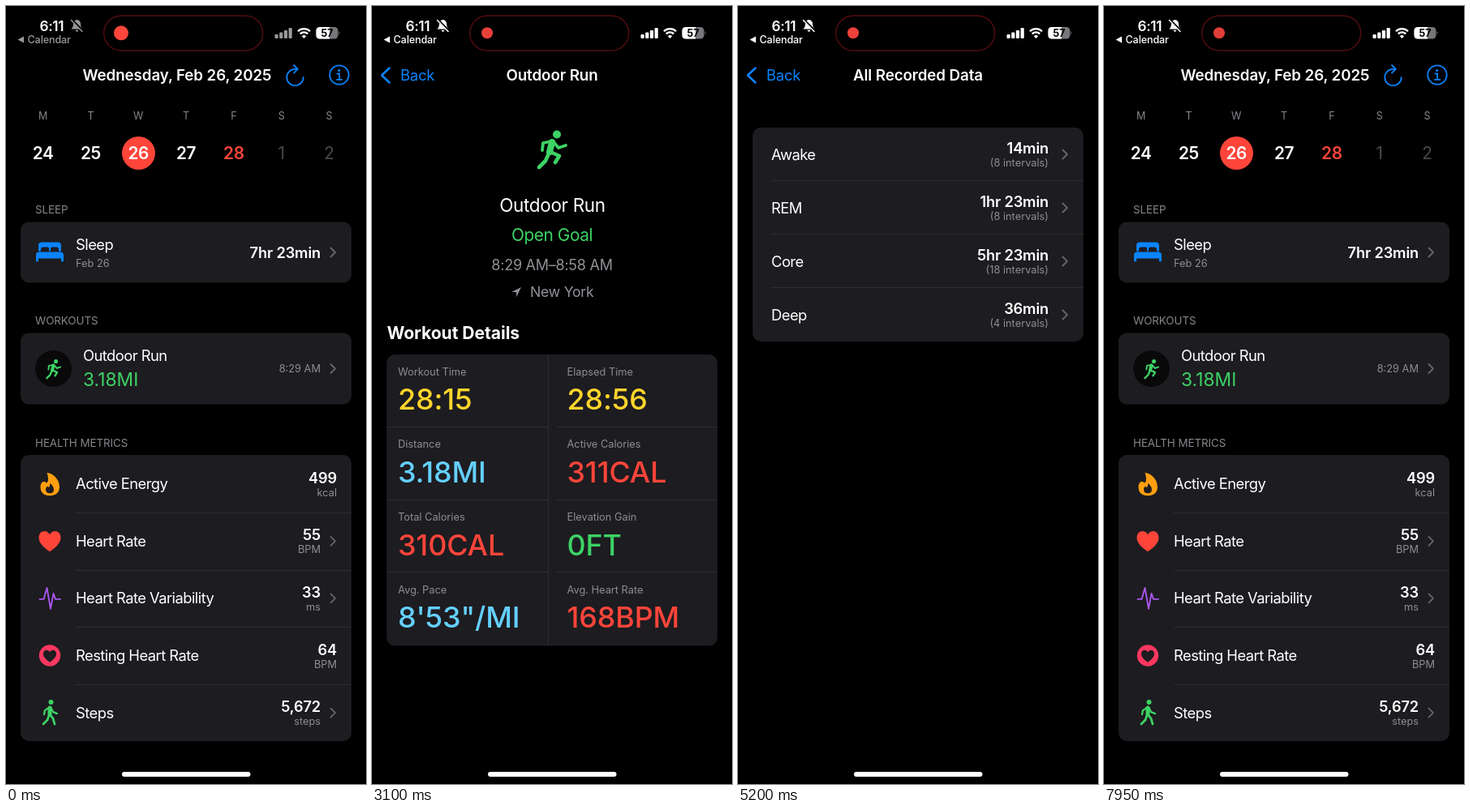
An HTML page for the animation above (8000 ms loop, 444 by 960 pixels).

```html
<!DOCTYPE html>
<html lang="en">
<head>
<meta charset="utf-8">
<title>Health diary</title>
<style>
  html, body { margin: 0; width: 100%; height: 100%; overflow: hidden; background: #000; }
  svg { display: block; width: 444px; height: 960px; }
  text { font-family: Inter, Roboto, sans-serif; fill: #fff; white-space: pre; }
  .body { font-size: 18.4px; letter-spacing: -.03em; }
  .title { font-size: 18.8px; font-weight: 600; letter-spacing: -.006em; }
  .value { font-size: 18.3px; font-weight: 600; letter-spacing: -.01em; }
  .small { font-size: 12.8px; fill: #8e8d93; }
  .section { font-size: 13.4px; letter-spacing: -.005em; fill: #87868c; }
  .day { font-size: 12.6px; fill: #87868c; }
  .date { font-size: 20.8px; font-weight: 600; letter-spacing: -.015em; }
  .future { font-size: 20.8px; fill: #4a494d; }
  .range { font-size: 18px; letter-spacing: -.014em; fill: #929197; }
  .place { font-size: 17.6px; letter-spacing: -.013em; fill: #929197; }
  .minutes { font-size: 18px; font-weight: 500; letter-spacing: -.02em; }
  .goal { font-size: 20.8px; letter-spacing: -.02em; }
  .name { font-size: 22.5px; letter-spacing: -.015em; }
  .distance { font-size: 22.8px; }
  .heading { font-size: 21px; font-weight: 700; }
  .big { font-size: 35.8px; font-weight: 500; letter-spacing: -.002em; }
  .back { font-size: 18.4px; letter-spacing: -.01em; }
  .clock { font-size: 17.3px; font-weight: 600; letter-spacing: -.02em; }
  .crumb { font-size: 12.6px; font-weight: 500; letter-spacing: -.01em; }
  .charge { font-size: 12.5px; font-weight: 700; }
</style>
</head>
<body>
<svg id="stage" viewBox="0 0 444 960"></svg>
<script>
const W = 444, LOOP = 8000, PARALLAX = 133;
const C = {
  card: '#1d1c20', line: '#2d2c31', blue: '#0a84ff', red: '#ff453a', green: '#3dd365',
  yellow: '#ffd52b', sky: '#64d0ff', orange: '#ff9f0f', purple: '#a955ee', pink: '#ff375f'
};

// Drawing helpers
const text = (x, y, str, cls, fill, anchor = 'start') =>
  `<text x="${x}" y="${y}" class="${cls}" text-anchor="${anchor}"${fill ? ` style="fill:${fill}"` : ''}>${str}</text>`;
const right = (x, y, str, cls, fill) => text(x, y, str, cls, fill, 'end');
const mid = (x, y, str, cls, fill) => text(x, y, str, cls, fill, 'middle');
const rect = (x, y, w, h, r, fill) => `<rect x="${x}" y="${y}" width="${w}" height="${h}" rx="${r}" fill="${fill}"/>`;
const card = (y, h) => rect(18, y, 408, h, 10, C.card);
const circle = (x, y, r, fill) => `<circle cx="${x}" cy="${y}" r="${r}" fill="${fill}"/>`;
const shape = (d, fill) => `<path d="${d}" fill="${fill}"/>`;
const stroke = (d, color, width) =>
  `<path d="${d}" fill="none" stroke="${color}" stroke-width="${width}" stroke-linecap="round" stroke-linejoin="round"/>`;
const rule = (x1, x2, y) => `<path d="M${x1} ${y}H${x2}" stroke="${C.line}"/>`;
const at = (x, y, scale, body) => `<g transform="translate(${x} ${y}) scale(${scale})">${body}</g>`;
const chevron = y => stroke(`M400.5 ${y - 5.5}l5.5 5.5l-5.5 5.5`, '#66656b', 1.8);

// Icons, centred on their own origin
const runner = circle(6, -18.5, 5, C.green) +
  stroke('M0 -9L-3 3', C.green, 8) +
  stroke('M2 -9L8 -2L17 -5M-1 -10L-11 -8L-12 1', C.green, 3.8) +
  stroke('M-2 3L9 8L4 16M-4 5L-8 14L-16 22', C.green, 4.6);
const walker = circle(1.5, -13, 3, C.green) +
  stroke('M0 -6L0 2', C.green, 5) +
  stroke('M0 -7L-6 -3L-7 2M1 -7L4 -1L9 1', C.green, 2.3) +
  stroke('M0 2L4 7L6 14M-1 3L-3 9L-8 14', C.green, 2.8);
const heartPath = 'M0 13C-4 10 -13.5 4 -13.5 -4C-13.5 -13 -4 -15 0 -8C4 -15 13.5 -13 13.5 -4C13.5 4 4 10 0 13Z';
const bed = shape('M-14 -1V-8Q-14 -12 -10 -12H10Q14 -12 14 -8V-1H11V-3Q11 -6 8 -6H3Q1 -6 1 -3V-1H-1V-3Q-1 -6 -3 -6H-8Q-11 -6 -11 -3V-1Z', C.blue) +
  shape('M-17 11V4Q-17 0 -13 0H13Q17 0 17 4V11Q17 12 15.5 12Q14 12 14 11V8H-14V11Q-14 12 -15.5 12Q-17 12 -17 11Z', C.blue);
const flame = shape('M-3.5 -14C4 -13 12 -6 12 4C12 10.5 7 14.5 0 14.5C-7 14.5 -11.5 10.5 -11.5 4C-11.5 0 -9.5 -3 -7.5 -3C-5.5 -3 -5 -1.5 -4 -1.5C-2.5 -1.5 -2 -4 -2 -6C-2 -9.5 -3 -12 -3.5 -14Z', C.orange) +
  shape('M0 -1C3 1 5 4 5 7C5 10 3 11.5 0 11.5C-3 11.5 -5 10 -5 7C-5 5 -4 3.5 -3 3C-2 4 -1 4 -1 4C0 3 0.5 1 0 -1Z', C.card);
const wave = stroke('M-12.5 1H-7.5L-3.5 -13L1 13L4.5 -6L7 1H13', C.purple, 1.9);
const restingHeart = circle(0, 0, 13.2, C.pink) + at(0, .5, .6, shape(heartPath, C.card));
const watch = rect(-4.5, -11.5, 9, 23, 3, C.blue) + rect(-7, -8, 14, 16, 4.5, C.blue) +
  rect(-5.2, -6.2, 10.4, 12.4, 3, '#12396b') + rect(7, -3, 1.4, 5, .7, C.blue);

// Screens
function homeScreen() {
  const days = [['M', 24], ['T', 25], ['W', 26], ['T', 27], ['F', 28], ['S', 1], ['S', 2]];
  let out = circle(163.5, 181.5, 20.5, C.red);
  days.forEach(([day, date], i) => {
    const x = 45.7 + i * 58.8;
    out += mid(x, 140, day, 'day') + mid(x, 189, date, i > 4 ? 'future' : 'date', i === 4 ? C.red : '');
  });
  out += text(36, 256, 'SLEEP', 'section') + card(266.5, 75) + at(54, 303.5, 1, bed) +
    text(86, 301, 'Sleep', 'body') + text(86, 321.5, 'Feb 26', 'small') +
    right(388, 310.5, '7hr 23min', 'value') + chevron(304);
  out += text(36, 393, 'WORKOUTS', 'section') + card(403.5, 88) +
    circle(58.5, 447.5, 22.5, '#09090a') + at(58.5, 448, .51, runner) +
    text(95, 438, 'Outdoor Run', 'body') + text(95, 469, '3.18MI', 'distance', C.green) +
    right(388, 452, '8:29 AM', 'small') + chevron(447.5);
  out += text(36, 544, 'HEALTH METRICS', 'section') + card(554, 353);
  const metrics = [
    ['Active Energy', '499', 'kcal', flame], ['Heart Rate', '55', 'BPM', shape(heartPath, C.red), true],
    ['Heart Rate Variability', '33', 'ms', wave, true], ['Resting Heart Rate', '64', 'BPM', restingHeart],
    ['Steps', '5,672', 'steps', walker, true]
  ];
  metrics.forEach(([label, value, unit, icon, linked], i) => {
    const y = 589.7 + i * 70.6, edge = linked ? 388 : 408;
    out += at(54, y, 1, icon) + text(86, y + 6.5, label, 'body') +
      right(edge, y - 1, value, 'value') + right(edge, y + 15, unit, 'small');
    if (linked) out += chevron(y);
    if (i) out += rule(86, 426, Math.round(y - 35.3) + .5);
  });
  return out;
}

function runScreen() {
  let out = at(222, 177, 1, runner) + mid(222.5, 254, 'Outdoor Run', 'name') +
    mid(222, 289.5, 'Open Goal', 'goal', C.green) + mid(222, 326, '8:29 AM–8:58 AM', 'range') +
    shape('M184 347L172 353H178V359Z', '#929197') + text(195, 359, 'New York', 'place') +
    text(18.5, 411, 'Workout Details', 'heading') + card(430, 359.5);
  const cells = [
    ['Workout Time', '28:15', C.yellow], ['Elapsed Time', '28:56', C.yellow],
    ['Distance', '3.18MI', C.sky], ['Active Calories', '311CAL', C.red],
    ['Total Calories', '310CAL', C.red], ['Elevation Gain', '0FT', C.green],
    ['Avg. Pace', '8\'53"/MI', C.sky], ['Avg. Heart Rate', '168BPM', C.red]
  ];
  cells.forEach(([label, value, color], i) => {
    const x = i % 2 ? 240.5 : 32, y = 430 + (i >> 1) * 89.8;
    out += text(x, y + 25.5, label, 'small') + text(x, y + 68, value, 'big', color);
    if (i > 1) out += i % 2 ? rule(228, 426, Math.round(y) - .5) : rule(18, 217, Math.round(y) - .5);
  });
  return out + `<path d="M217.5 430V789" stroke="${C.line}"/>`;
}

function sleepScreen() {
  const stages = [['Awake', '14min', 8], ['REM', '1hr 23min', 8], ['Core', '5hr 23min', 18], ['Deep', '36min', 4]];
  return card(150, 264) + stages.map(([label, value, count], i) => {
    const y = 183 + i * 66;
    return text(41, y + 6.5, label, 'body') + right(383, y - 1, value, 'value') +
      right(383, y + 15, `(${count} intervals)`, 'small') + chevron(y) + (i ? rule(41, 426, y - 33.5) : '');
  }).join('');
}

function intervalScreen() {
  const rows = [[6, '1:08', '1:14'], [0, '2:07', '2:07'], [0, '4:27', '4:27'], [1, '4:32', '4:33'],
    [0, '7:20', '7:20'], [3, '7:22', '7:25'], [2, '7:27', '7:29'], [0, '7:44', '7:44']];
  return text(18, 141, 'AWAKE INTERVALS', 'section') + card(162, 423.5) + rows.map(([min, from, to], i) => {
    const y = 188.2 + i * 52.95;
    return at(43, y, 1, watch) + text(64, y + 6.5, min + 'min', 'minutes') +
      right(412, y + 6.5, `${from} AM - ${to} AM`, 'range') + (i ? rule(64, 426, Math.round(y - 26.5) + .5) : '');
  }).join('');
}

const homeBar = text(94.5, 92, 'Wednesday, Feb 26, 2025', 'title') +
  stroke('M359 77.8H356.5A10.2 10.2 0 1 0 366.7 88M355 73L359.8 77.8L355 82.6', C.blue, 1.8) +
  `<circle cx="411" cy="85" r="11.7" fill="none" stroke="${C.blue}" stroke-width="1.8"/>` +
  circle(410.7, 79.5, 1.6, C.blue) + stroke('M408.5 83.5H411.2V90.5M408 90.8H414.3', C.blue, 1.8);
const backButton = stroke('M21.5 76.5L12 85.5L21.5 94.5', C.blue, 2.5) + text(35, 92, 'Back', 'back', C.blue);

const statusBar = text(41.5, 30.5, '6:11', 'clock') +
  `<g id="fading">${shape('M14.5 41.5L22 37.5V45.5Z', '#fff') + text(26.5, 46, 'Calendar', 'crumb')}
   ${shape('M80.5 28.5Q83 26.5 83 22.5Q83 17.5 87.5 17Q92 17.5 92 22.5Q92 26.5 94.5 28.5Z', '#fff')}
   ${shape('M85.5 29.7H89.5Q89 31.8 87.5 31.8Q86 31.8 85.5 29.7Z', '#fff')}
   ${stroke('M81.5 17.5L95 31', '#000', 3) + stroke('M80.5 17.5L94 31.5', '#fff', 1.5)}
   ${[5, 7.5, 10, 13].map((h, i) => rect(331.5 + i * 5.7, 40 - h, 4.2, h, 1.2, '#fff')).join('')}</g>` +
  `<path d="M360 31.2A10.6 10.6 0 0 1 375 31.2M362.8 34.4A6.6 6.6 0 0 1 372.2 34.4" fill="none" stroke="#fff" stroke-width="2.3"/>` +
  shape('M367.5 40L364.8 37.2A3.9 3.9 0 0 1 370.2 37.2Z', '#fff') +
  rect(382.5, 26, 27, 14.5, 4.5, '#77767a') +
  shape('M387 26H399V40.5H387Q382.5 40.5 382.5 36V30.5Q382.5 26 387 26Z', '#fff') +
  shape('M410.5 31Q412.5 33.2 410.5 35.5Z', '#77767a') + mid(396, 37.8, '57', 'charge', '#000') +
  `<rect x="120.7" y="12" width="196" height="43" rx="21.5" fill="#000" stroke="#550d10" stroke-width="1.4"/>` +
  `<circle id="dot" cx="142" cy="33.3"/>` + rect(143, 945, 158.5, 6, 3, '#fff');

// Listed from the bottom of the navigation stack upwards
const content = {
  home: [homeScreen(), homeBar],
  run: [runScreen(), mid(222, 92, 'Outdoor Run', 'title')],
  sleep: [sleepScreen(), mid(222, 92, 'All Recorded Data', 'title')],
  intervals: [intervalScreen(), mid(222, 92, 'All Recorded Data', 'title')]
};
const names = Object.keys(content);
const $ = id => document.getElementById(id);

$('stage').innerHTML =
  names.map(n => `<g id="${n}">${rect(0, 0, W, 960, 0, '#000')}<g id="${n}Body">${content[n][0]}</g></g>`).join('') +
  names.map(n => `<g id="${n}Bar">${content[n][1]}</g>`).join('') +
  `<g id="back">${backButton}</g>` + statusBar;

const moves = [
  [-2000, 'run', 'home'], [1100, 'home', 'run'], [3117, 'run', 'home'], [3900, 'home', 'sleep'],
  [5450, 'sleep', 'intervals'], [6517, 'intervals', 'sleep'], [7120, 'sleep', 'home']
];

// Critically damped spring: stiffness 1000, mass 3
function spring(ms) {
  const x = Math.sqrt(1000 / 3) * ms / 1000;
  return x > 10 ? 1 : 1 - (1 + x) * Math.exp(-x);
}
const clamp = v => Math.max(0, Math.min(1, v));

function place(name, x, dim, barX, barOpacity) {
  $(name).style.display = '';
  $(name).setAttribute('transform', `translate(${x.toFixed(2)} 0)`);
  $(name + 'Body').setAttribute('opacity', 1 - .2 * dim);
  $(name + 'Bar').setAttribute('transform', `translate(${barX.toFixed(2)} 0)`);
  $(name + 'Bar').setAttribute('opacity', barOpacity);
}

function draw(t) {
  const [start, from, to] = moves.filter(m => m[0] <= t).pop();
  const p = spring(t - start);
  const push = names.indexOf(to) > names.indexOf(from);
  const cover = push ? p : 1 - p;
  const [under, top] = push ? [from, to] : [to, from];

  for (const n of names) {
    $(n).style.display = 'none';
    $(n + 'Bar').setAttribute('opacity', 0);
  }
  if (cover < 1) place(under, -PARALLAX * cover, cover, 0, clamp(1 - 1.5 * cover));
  if (cover > 0) place(top, W * (1 - cover), 0, 150 * (1 - cover), clamp(1.5 * cover - .5));
  $('back').setAttribute('opacity', under === 'home' ? cover : 1);

  const settle = clamp(t / 400);
  const glow = .5 + .5 * Math.cos(t / 2300 * 2 * Math.PI);
  $('fading').setAttribute('opacity', .6 + .4 * settle);
  $('dot').setAttribute('r', 9 - 2 * settle);
  $('dot').setAttribute('fill', `rgb(${222 + 33 * glow}, ${62 + 8 * glow}, ${56 + 4 * glow})`);
}

function frame() {
  draw(performance.now() % LOOP);
  requestAnimationFrame(frame);
}
frame();
</script>
</body>
</html>
```
